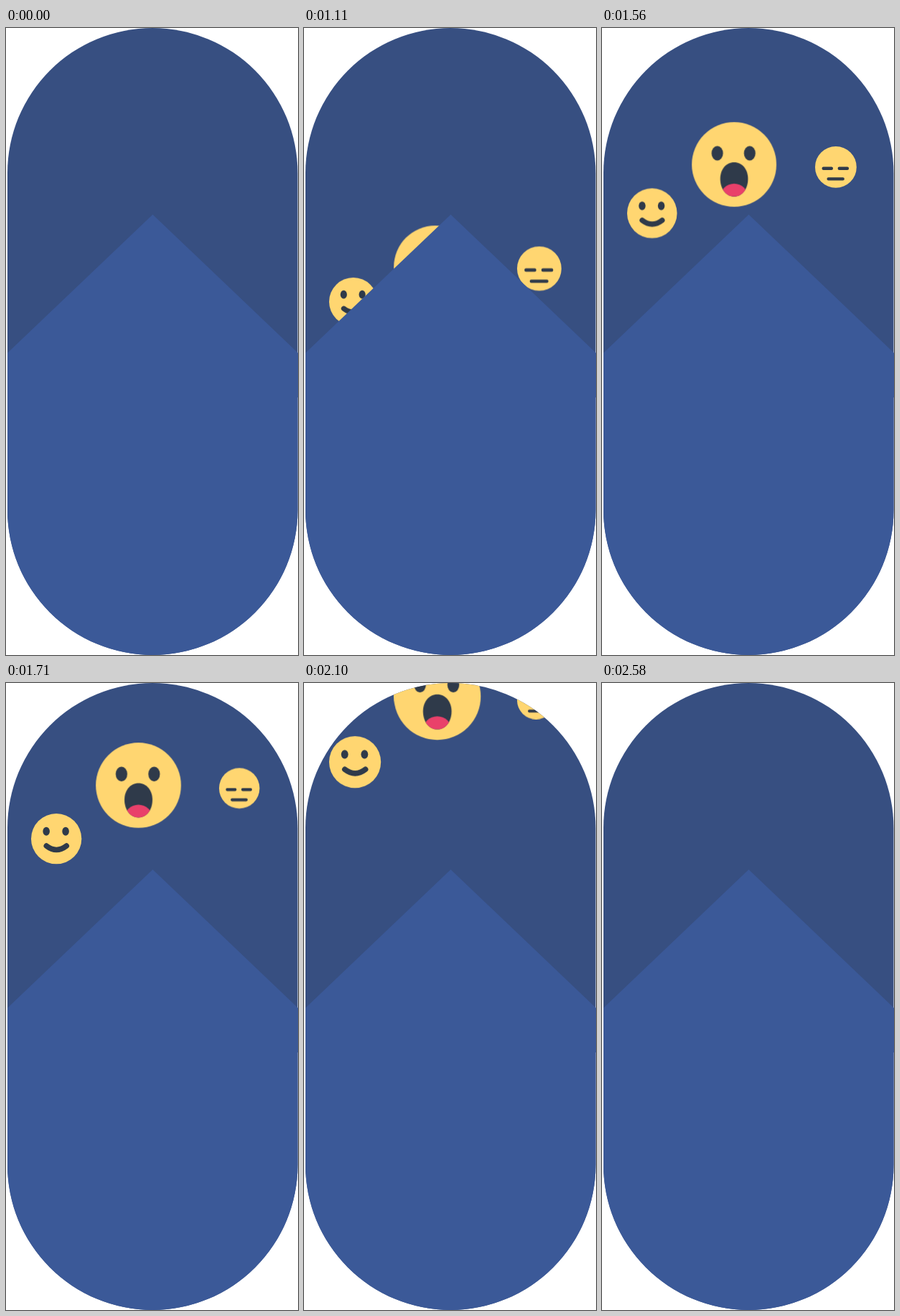
An HTML page that plays this animation: 407 px wide and 874 px high, repeating every 2.64 s.

```html
<!DOCTYPE html>
<html lang="en">
<head>
<meta charset="utf-8">
<title>Rising faces</title>
<style>
  html, body { margin: 0; width: 100%; height: 100%; overflow: hidden; background: #fff; }
  svg { display: block; width: 407px; height: 874px; }
  .face {
    transform-origin: 0 0;
    animation: rise 2640ms steps(88, end) -1ms infinite;
  }
  /* Each face is drawn in a 100-unit box; --d is its diameter / 100. */
  @keyframes rise {
    from { transform: translate(var(--x), var(--y0)) scale(var(--d0)); }
    to   { transform: translate(var(--x), var(--y1)) scale(var(--d1)); }
  }
  .wow   { --x: 125.2px; --y0: 631.2px; --y1: -214.9px; --d0: 1.085; --d1: 1.244; }
  .smile { --x: 35px;    --y0: 654.8px; --y1: -75.2px;  --d0: .621;  --d1: .748; }
  .blank { --x: 297px;   --y0: 648.6px; --y1: -169.8px; --d0: .718;  --d1: .481; }
  .skin { fill: #ffd671; }
  .ink  { fill: #2f3a4a; }
  .line { fill: none; stroke: #2f3a4a; stroke-linecap: round; }
</style>
</head>
<body>
<svg viewBox="0 0 407 874">
  <defs>
    <clipPath id="pill"><rect x="2" width="404.5" height="874" rx="202.25"/></clipPath>
    <path id="mouth" d="M33.6 67C33.6 56 40.5 47.6 50 47.6S66.4 56 66.4 67C66.4 79 59.5 88 50 88S33.6 79 33.6 67Z"/>
    <clipPath id="inMouth"><use href="#mouth"/></clipPath>
    <circle id="head" cx="50" cy="50" r="50"/>
    <g id="eyes">
      <ellipse cx="30.1" cy="36" rx="6.8" ry="8.6"/>
      <ellipse cx="68.4" cy="36" rx="6.8" ry="8.6"/>
    </g>
  </defs>
  <g clip-path="url(#pill)">
    <rect width="407" height="874" fill="#374f81"/>
    <g class="face wow">
      <use href="#head" class="skin"/>
      <use href="#eyes" y=".8" class="ink"/>
      <use href="#mouth" class="ink"/>
      <circle cx="50" cy="89.5" r="16.7" fill="#e9406a" clip-path="url(#inMouth)"/>
    </g>
    <g class="face smile">
      <use href="#head" class="skin"/>
      <use href="#eyes" y="-.9" class="ink"/>
      <path class="line" stroke-width="10.5" d="M30.2 64Q50.2 79.5 70.2 64"/>
    </g>
    <g class="face blank">
      <use href="#head" class="skin"/>
      <path class="line" stroke-width="7.5" d="M20.2 53.2H39.6M58.4 53.2H77.8M32.2 78.5H67"/>
    </g>
    <path d="M0 455L204.5 260L407 453V874H0Z" fill="#3b5998"/>
  </g>
</svg>
</body>
</html>
```
